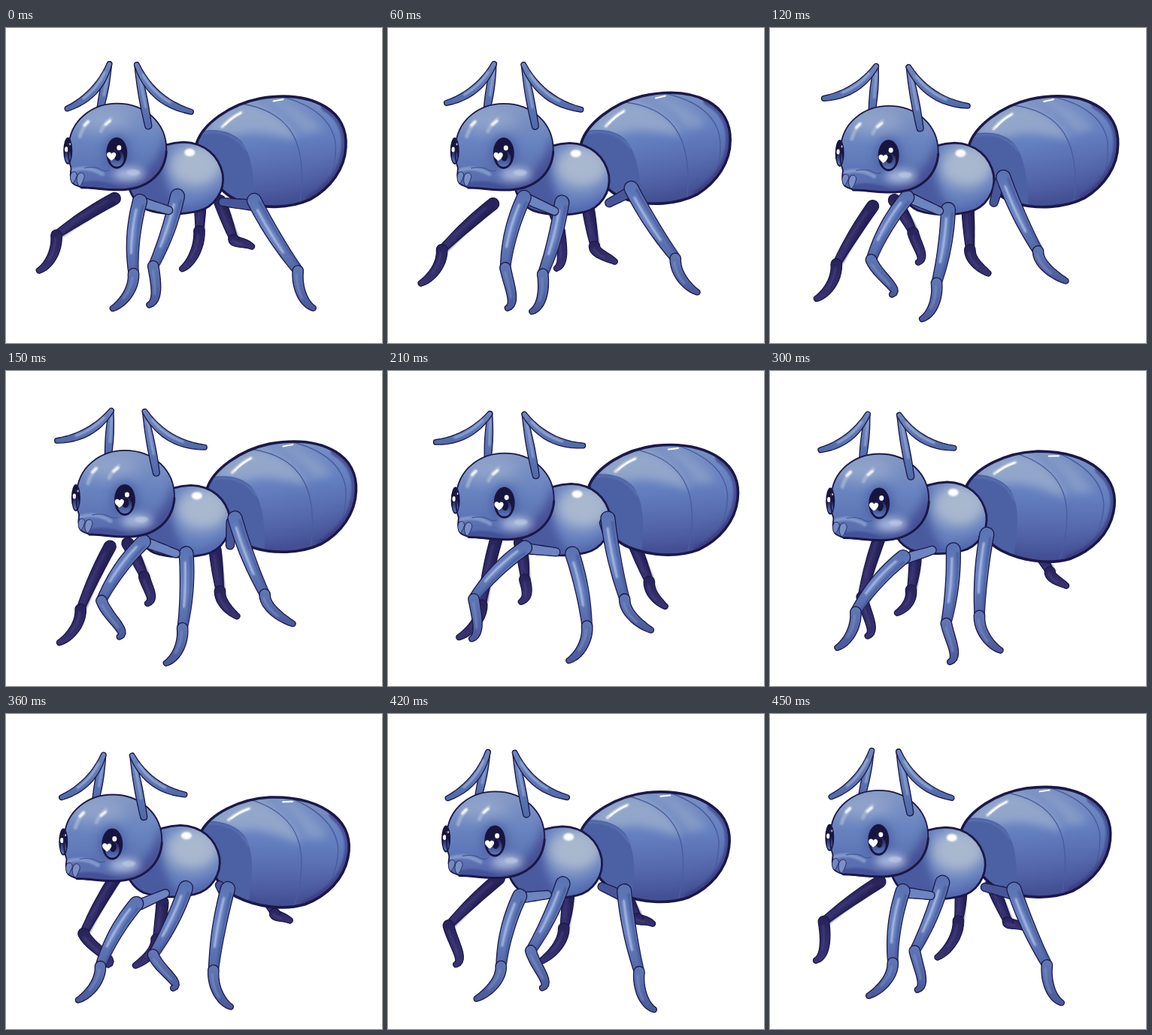
An HTML page that plays this animation: 500 px wide and 420 px high, repeating every 0.48 s.

```html
<!DOCTYPE html>
<html lang="en">
<head>
<meta charset="utf-8">
<title>Walking ant</title>
<style>
html, body { margin: 0; width: 100%; height: 100%; overflow: hidden; background: #fff; }
svg { display: block; width: 500px; height: 420px; }
.ink { stroke: #1b1848; stroke-linejoin: round; stroke-linecap: round; }
.line { fill: none; stroke-linecap: round; stroke-linejoin: round; }
</style>
</head>
<body>
<svg viewBox="0 0 500 420" xmlns="http://www.w3.org/2000/svg">
<defs>
  <filter id="b2" x="-60%" y="-60%" width="220%" height="220%"><feGaussianBlur stdDeviation="1.2"/></filter>
  <filter id="b6" x="-60%" y="-60%" width="220%" height="220%"><feGaussianBlur stdDeviation="6"/></filter>
  <filter id="b10" x="-60%" y="-60%" width="220%" height="220%"><feGaussianBlur stdDeviation="10"/></filter>
  <linearGradient id="near" x1="0" y1="0" x2="0" y2="1">
    <stop offset="0" stop-color="#5a72b2"/><stop offset=".5" stop-color="#6882c2"/><stop offset="1" stop-color="#5064a4"/>
  </linearGradient>
  <linearGradient id="nearFoot" x1="0" y1="0" x2="0" y2="1">
    <stop offset="0" stop-color="#6179b6"/><stop offset="1" stop-color="#4a5798"/>
  </linearGradient>
  <linearGradient id="far" x1="0" y1="0" x2="0" y2="1">
    <stop offset="0" stop-color="#28225a"/><stop offset="1" stop-color="#3a3474"/>
  </linearGradient>
  <linearGradient id="feeler" x1="0" y1="0" x2="0" y2="1">
    <stop offset="0" stop-color="#6f87bd"/><stop offset="1" stop-color="#5069aa"/>
  </linearGradient>
  <linearGradient id="skin" x1="0" y1="0" x2="0" y2="1">
    <stop offset="0" stop-color="#8398c4"/><stop offset=".45" stop-color="#6883c0"/><stop offset="1" stop-color="#5468aa"/>
  </linearGradient>
  <linearGradient id="tail" x1="0" y1="0" x2=".15" y2="1">
    <stop offset="0" stop-color="#7f96c4"/><stop offset=".45" stop-color="#6580c1"/><stop offset="1" stop-color="#48569a"/>
  </linearGradient>
  <linearGradient id="iris" x1="0" y1="0" x2="0" y2="1">
    <stop offset="0" stop-color="#1d1c50"/><stop offset="1" stop-color="#5b78c0"/>
  </linearGradient>
  <path id="tailShape" d="M255 153C264 128 300 103 340 96C374 91 405 95 427 109C446 121 455 140 453 163C451 192 432 217 404 232C376 244 340 243 312 233C284 223 262 190 255 153Z"/>
  <path id="bodyShape" d="M160 200C172 172 202 152 236 151C264 152 283 169 288 194C291 216 277 238 255 243C230 249 204 247 187 241C172 234 164 220 160 200Z"/>
  <path id="headShape" d="M83 160C84 122 116 101 147 101C186 101 213 128 213 162C213 193 191 214 156 216C134 217 112 213 100 213C94 210 86 210 86 200C84 194 87 190 86 186C83 178 82 170 83 160Z"/>
  <clipPath id="tailClip"><use href="#tailShape"/></clipPath>
  <clipPath id="bodyClip"><use href="#bodyShape"/></clipPath>
  <clipPath id="headClip"><use href="#headShape"/></clipPath>
</defs>

<g id="farLegs"></g>

<g id="tailPart">
  <use href="#tailShape" fill="url(#tail)"/>
  <g clip-path="url(#tailClip)">
    <path d="M262 140C280 112 310 102 328 102C362 112 384 134 390 152C360 146 330 136 306 145Z" fill="#9eb0cd" opacity=".75" filter="url(#b6)"/>
    <path d="M345 96C372 96 405 116 424 140L394 145C386 125 364 107 345 96Z" fill="#90a4ca" opacity=".7" filter="url(#b6)"/>
    <path d="M250 195C300 250 390 246 450 190L456 260H250Z" fill="#3e4288" opacity=".5" filter="url(#b10)"/>
    <path d="M250 140C275 133 300 137 314 152C327 170 331 196 329 240L270 230Z" fill="#4c60a4"/>
    <path d="M262 141C286 137 306 143 320 164" class="line" stroke="#5f77b4" stroke-width="2" filter="url(#b2)"/>
    <path d="M319 103C362 112 384 134 391 168C396 194 394 216 389 242" class="line" stroke="#4b5c9e" stroke-width="1.5"/>
    <path d="M369 94C410 106 434 126 439 155C441 176 436 196 428 214" class="line" stroke="#4b5c9e" stroke-width="1.5"/>
    <path d="M427 109C446 121 455 140 453 163C451 192 432 217 404 232" class="line" stroke="#39397f" stroke-width="12" opacity=".65" filter="url(#b2)"/>
    <path d="M289 133Q300 121 315 114" class="line" stroke="#fff" stroke-width="3" filter="url(#b2)"/>
    <path d="M293 130Q302 121 314 115M358 100L371 98" class="line" stroke="#fff" stroke-width="2"/>
  </g>
  <use href="#tailShape" class="ink" fill="none" stroke-width="3.6"/>
</g>

<g id="bodyPart">
  <use href="#bodyShape" fill="#637dbd"/>
  <g clip-path="url(#bodyClip)">
    <ellipse cx="250" cy="183" rx="36" ry="29" fill="#a9b8d0" filter="url(#b10)"/>
    <ellipse cx="256" cy="180" rx="27" ry="21" fill="#a9b8cf" opacity=".75" filter="url(#b6)"/>
    <path d="M160 170L212 160C205 190 214 218 236 248L160 252Z" fill="#424f96" opacity=".75" filter="url(#b6)"/>
    <path d="M205 238Q255 244 285 218L290 254H200Z" fill="#4c5ca4" opacity=".7" filter="url(#b6)"/>
    <ellipse cx="244" cy="165" rx="7" ry="5" fill="#fff" filter="url(#b2)"/>
  </g>
  <use href="#bodyShape" class="ink" fill="none" stroke-width="2.8"/>
</g>

<g id="nearLegs"></g>
<g id="backFeeler"></g>

<g id="headPart">
  <use href="#headShape" fill="url(#skin)"/>
  <g clip-path="url(#headClip)">
    <ellipse cx="128" cy="123" rx="38" ry="15" fill="#a0b1d0" opacity=".65" filter="url(#b10)"/>
    <path d="M212 135C206 180 182 208 130 211L150 232L226 205Z" fill="#3c438a" opacity=".7" filter="url(#b6)"/>
    <ellipse cx="147" cy="167" rx="19" ry="26" fill="#4458a0" opacity=".6" filter="url(#b6)"/>
    <ellipse cx="163" cy="195" rx="21" ry="9" fill="#a9b8dc" filter="url(#b6)"/>
    <ellipse cx="169" cy="193" rx="9" ry="4" fill="#c3cfe8" opacity=".6" filter="url(#b2)"/>
    <path d="M100 206Q126 200 150 213L100 218Z" fill="#424e97" opacity=".8" filter="url(#b2)"/>
    <path d="M88 190Q108 183 128 195" class="line" stroke="#8299cc" stroke-width="5" filter="url(#b2)"/>
    <path d="M104 187Q118 184 128 190Q133 192 137 190" class="line" stroke="#465796" stroke-width="1.2"/>
    <path d="M98 145Q101 134 109 125M126 138Q130 128 139 121" class="line" stroke="#b4c2da" stroke-width="5" opacity=".6" filter="url(#b2)"/>
    <path d="M104 130L109 125M132 129L138 124" class="line" stroke="#fff" stroke-width="3.5" filter="url(#b2)"/>
  </g>
  <ellipse cx="82" cy="164" rx="6" ry="18" fill="#17153f"/>
  <ellipse cx="82" cy="171" rx="3.8" ry="9" fill="url(#iris)"/>
  <ellipse cx="80" cy="162" rx="2.2" ry="3.5" fill="#fff"/>
  <circle cx="84" cy="155" r="1.7" fill="#fff"/>
  <use href="#headShape" class="ink" fill="none" stroke-width="1.8"/>
  <path d="M100 213C118 213 134 217 156 216C190 214 211 193 213 165" class="line ink" stroke-width="3"/>
  <path d="M87 193C91 190 94 193 94 197C92 203 90 207 88 207C85 204 84 197 87 193Z" fill="#7289c3" class="ink" stroke-width=".8"/>
  <path d="M96 195C100 191 104 194 104 199C102 205 100 211 97 211C93 207 93 199 96 195Z" fill="#7a91c8" class="ink" stroke-width=".8"/>
  <ellipse cx="147" cy="167" rx="14" ry="21" fill="#17153f"/>
  <ellipse cx="147" cy="174" rx="9.5" ry="11" fill="url(#iris)"/>
  <ellipse cx="148" cy="171" rx="4.5" ry="6.5" fill="#17153f"/>
  <path d="M140 177C136 174 133 171 134 168C135 165 139 165 140 168C142 165 146 166 146 169C146 172 143 175 140 177Z" fill="#fff"/>
  <ellipse cx="150" cy="160" rx="3" ry="3.4" fill="#fff"/>
</g>

<g id="frontFeeler"></g>
</svg>
<script>
const LOOP = 480, STEP = 30;
const $ = id => document.getElementById(id);

const rad = deg => deg * Math.PI / 180;

// One swing per loop, highest at the given angle of the cycle
const wave = (t, mid, size, peak, times = 1) =>
  mid + size * Math.cos(times * (2 * Math.PI * t / LOOP - rad(peak)));

const head = t => [wave(t, 2.5, 8.5, 105), wave(t, 4.7, 5.3, 200)];
const body = t => [wave(t, 2.7, 7.2, 110), wave(t, -.3, 2.8, 60)];
const tail = t => [
  wave(t, 5, 6.5, 140) + wave(t, 0, 2, 120, 2),
  wave(t, 4.5, 10, 245) + wave(t, 0, 3, 105, 2),
  wave(t, 1.8, 6, 240)
];

// Smooth cyclic curve through evenly spaced poses
function cycle(poses, t) {
  const n = poses.length, f = t / LOOP * n, i = Math.floor(f), u = f - i;
  const [a, b, c, d] = [-1, 0, 1, 2].map(k => poses[(i + k + n) % n]);
  return b.map((v, k) => v + u / 2 * (c[k] - a[k]
    + u * (2 * a[k] - 5 * v + 4 * c[k] - d[k] + u * (3 * (v - c[k]) + d[k] - a[k]))));
}

// Point and unit normal on a cubic
function onCurve(p, s) {
  const r = 1 - s;
  const pos = k => r * r * r * p[0][k] + 3 * r * r * s * p[1][k] + 3 * r * s * s * p[2][k] + s * s * s * p[3][k];
  const dir = k => r * r * (p[1][k] - p[0][k]) + 2 * r * s * (p[2][k] - p[1][k]) + s * s * (p[3][k] - p[2][k]);
  const dx = dir(0), dy = dir(1), len = Math.hypot(dx, dy) || 1;
  return [pos(0), pos(1), -dy / len, dx / len];
}

const pt = (x, y) => x.toFixed(1) + ' ' + y.toFixed(1);

// Closed tube; width(s) gives its thickness along the curve
function tube(p, width) {
  const a = [], b = [], n = 12;
  for (let i = 0; i <= n; i++) {
    const s = i / n, [x, y, nx, ny] = onCurve(p, s), r = width(s) / 2;
    a.push(pt(x + nx * r, y + ny * r));
    b.unshift(pt(x - nx * r, y - ny * r));
  }
  const r0 = width(0) / 2, r1 = width(1) / 2;
  return `M${a.join('L')}A${r1} ${r1} 0 0 0 ${b[0]}L${b.join('L')}A${r0} ${r0} 0 0 0 ${a[0]}Z`;
}

// Line running beside the curve
function beside(p, off, from, to) {
  const out = [];
  for (let i = 0; i <= 8; i++) {
    const [x, y, nx, ny] = onCurve(p, from + (to - from) * i / 8);
    out.push(pt(x + nx * off, y + ny * off));
  }
  return 'M' + out.join('L');
}

// Cubic from a to b, bowed sideways
function bow(a, b, k) {
  const dx = b[0] - a[0], dy = b[1] - a[1];
  const mid = s => [a[0] + dx * s - dy * k, a[1] + dy * s + dx * k];
  return [a, mid(.33), mid(.67), b];
}

// From a point, a length away at an angle off straight down
const reach = ([x, y], len, deg) => [x + len * Math.sin(rad(deg)), y + len * Math.cos(rad(deg))];

function add(parent, attrs) {
  const el = document.createElementNS('http://www.w3.org/2000/svg', 'path');
  for (const k in attrs) el.setAttribute(k, attrs[k]);
  parent.appendChild(el);
  return el;
}
const skin = (parent, fill) => add(parent, { class: 'ink', fill, 'stroke-width': 1.3 });
const glint = (parent, stroke, w, opacity) =>
  add(parent, { class: 'line', stroke, 'stroke-width': w, opacity, filter: 'url(#b2)' });

// poses: hip x, hip y, thigh angle, shin angle, at each quarter of the loop
function makeLeg({ far, thigh, shin, stretch = [0, 0], hook, bend, socket, poses }) {
  const parent = $(far ? 'farLegs' : 'nearLegs');
  const coxa = socket && skin(parent, socket.fill);
  const upper = skin(parent, far ? 'url(#far)' : 'url(#near)');
  const shade = glint(parent, far ? '#1d1846' : '#41508f', 3.5, .6);
  const shine = glint(parent, far ? '#4c4786' : '#b7c8ea', far ? 2 : 2.6, far ? .6 : .95);
  const foot = skin(parent, far ? 'url(#far)' : 'url(#nearFoot)');
  const footShine = glint(parent, far ? '#514b8a' : '#869dd0', 2.5, .6);
  const w = far ? 16 : 19;
  return t => {
    const [hx, hy, a, b] = cycle(poses, t);
    const hip = [hx, hy], ankle = reach(hip, thigh, a);
    const toe = reach(ankle, wave(t, shin, ...stretch), b);
    const [ax, ay] = ankle, [tx, ty] = toe;
    const up = bow(hip, ankle, bend);
    const low = [ankle, [ax + (tx - ax) * .12 + hook * .35, ay + (ty - ay) * .45], [tx + hook, ty - 6], toe];
    upper.setAttribute('d', tube(up, s => w - 6 * s + 1.5 * Math.sin(Math.PI * s)));
    shade.setAttribute('d', beside(up, -5.5, .05, .95));
    shine.setAttribute('d', beside(up, 2, .12, .72));
    foot.setAttribute('d', tube(low, s => 14.5 - 3 * s - 4 * s * s * s));
    footShine.setAttribute('d', beside(low, 1.5, .08, .6));
    if (coxa) {
      const [bx, by] = body(t);
      coxa.setAttribute('d', tube(bow([hx + socket.dx, hy + socket.dy], [socket.x + bx, socket.y + by], 0), s => 14 - 3 * s));
    }
  };
}

function makeFeeler(id, base, bend, elbow, tip) {
  const parent = $(id);
  const stalk = skin(parent, 'url(#feeler)');
  const stalkShine = glint(parent, '#a9bbdf', 2.2, .8);
  const whip = skin(parent, 'url(#feeler)');
  const whipShine = glint(parent, '#aec0e4', 2.4, .85);
  return t => {
    const [hx, hy] = head(t), place = ([x, y]) => [x + hx, y + hy];
    const joint = place(elbow(t));
    const low = bow(place(base), joint, 0);
    const high = bow(joint, place(tip(t)), bend);
    stalk.setAttribute('d', tube(low, s => 9 + 3 * Math.sin(Math.PI * s) - 3 * s));
    stalkShine.setAttribute('d', beside(low, 1, .3, .85));
    whip.setAttribute('d', tube(high, s => 6 + 4.5 * Math.sin(Math.PI * Math.min(1, s * .9 + .05))));
    whipShine.setAttribute('d', beside(high, bend > 0 ? -1.5 : 1.5, .15, .7));
  };
}

const parts = [
  makeLeg({ far: true, thigh: 55, shin: 31, stretch: [10, 120], hook: -9, bend: 0,
    poses: [[284, 230, 20, 68], [263, 241, 3, 38], [343, 226, 27, 35], [330, 218, 30, 64]] }),
  makeLeg({ far: true, thigh: 50, shin: 43, stretch: [13, -10], hook: 11, bend: -.03,
    poses: [[257, 220, 0, -24], [165, 229, 30, 10], [183, 230, 0, -18], [208, 251, -9, -39]] }),
  makeLeg({ far: true, thigh: 92, shin: 53, hook: 13, bend: .02,
    poses: [[145, 227, -58, -26], [137, 237, -32, -30], [147, 217, -10, -30], [149, 213, -30, 38]] }),
  makeLeg({ thigh: 110, shin: 54, hook: -13, bend: .03,
    socket: { x: 288, y: 231, dx: -4, dy: 6, fill: '#465699' },
    poses: [[330, 230, 32, 22], [310, 198, 25, 43], [289, 200, 7, 38], [295, 233, -10, 25]] }),
  makeLeg({ thigh: 99, shin: 52, hook: 13, bend: -.04,
    poses: [[228, 224, -19, -6], [237, 242, -9, -22], [246, 242, 13, -24], [239, 232, -26, 31]] }),
  makeLeg({ thigh: 97, shin: 54, hook: 13, bend: .06,
    socket: { x: 216, y: 242, dx: 4, dy: 2, fill: '#6c84bf' },
    poses: [[178, 231, -5, -31], [183, 225, -30, 31], [182, 239, -47, -15], [174, 252, -30, -33]] }),
  makeFeeler('backFeeler', [125, 108], -.15,
    t => [wave(t, 133, 5, 330), 48],
    t => [wave(t, 70, 14.5, 320), wave(t, 98, 12, 325)]),
  makeFeeler('frontFeeler', [189, 131], .17,
    () => [173.5, 49],
    t => [wave(t, 248, 5, 115), wave(t, 101, 11, 0)])
];

function draw(t) {
  const [tx, ty, turn] = tail(t);
  $('tailPart').setAttribute('transform', `translate(${tx} ${ty}) rotate(${turn} 354 168)`);
  $('bodyPart').setAttribute('transform', `translate(${body(t)})`);
  $('headPart').setAttribute('transform', `translate(${head(t)})`);
  parts.forEach(move => move(t));
}

const start = performance.now();
let shown = -1;
function tick() {
  const t = Math.floor((performance.now() - start) % LOOP / STEP) * STEP;
  if (t !== shown) draw(shown = t);
  requestAnimationFrame(tick);
}
tick();
</script>
</body>
</html>
```
